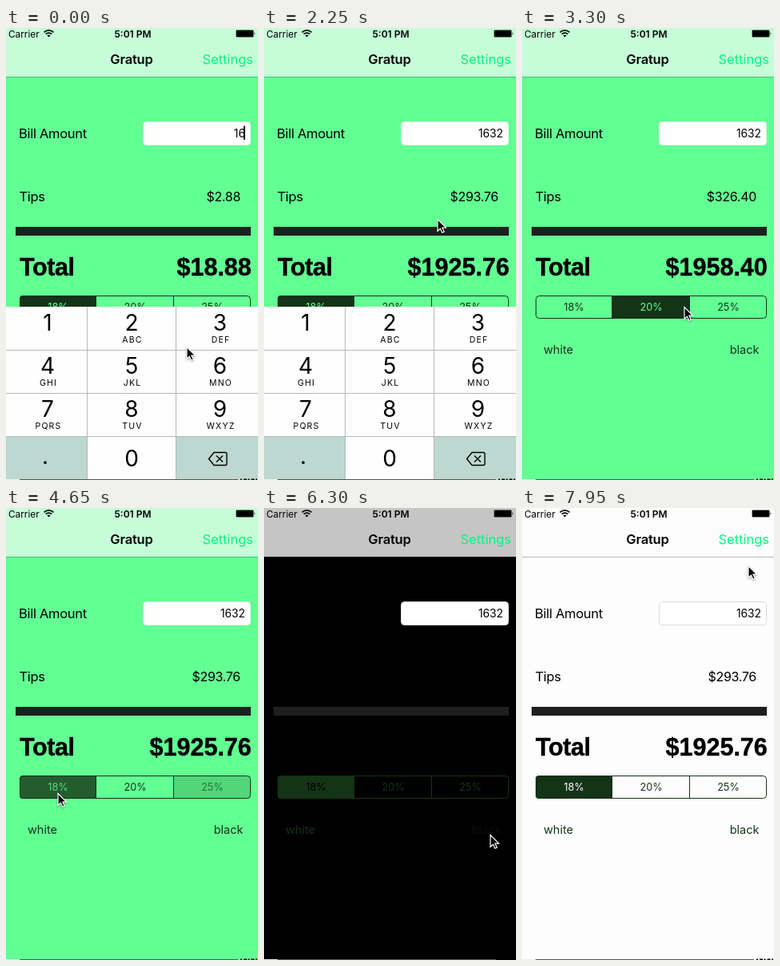
An HTML page that plays this animation: 315x566 px, repeating every 8 s.

```html
<!DOCTYPE html>
<html lang="en">
<head>
<meta charset="utf-8">
<title>Tip calculator</title>
<style>
  html, body { margin: 0; height: 100%; overflow: hidden; }
  svg { display: block; width: 100vw; height: 100vh; font-family: Inter, "Open Sans", sans-serif; }
  text { white-space: pre; }
  .end { text-anchor: end; }
  .mid { text-anchor: middle; }
  .label { font-size: 16.5px; letter-spacing: -.3px; }
  .total { font: bold 30.5px "Liberation Sans", Arial, sans-serif; stroke: #000; stroke-width: .4px; }
  .button { font-size: 14.5px; fill: #143317; }
  .segment { font-size: 12.7px; }
  .digit { font-size: 28px; }
  .letters { font-size: 10.5px; letter-spacing: 1.2px; }
  #cursor { filter: drop-shadow(0 1px 1px rgba(0, 0, 0, .4)); }
</style>
</head>
<body>
<svg id="stage" viewBox="0 0 315 566">
  <defs><clipPath id="pill"><rect x="17" y="335" width="289" height="29" rx="4"/></clipPath></defs>
  <rect id="page" width="315" height="566"/>

  <rect id="nav" width="315" height="61"/>
  <rect y="61" width="315" height="1" opacity=".25"/>
  <text x="3" y="11.5" font-size="11.8">Carrier</text>
  <g fill="none" stroke="#000" stroke-width="1.7">
    <path d="M47.5 5.4Q53.5 .2 59.5 5.4M49.7 7.7Q53.5 4.4 57.3 7.7"/>
    <path d="M51.4 9.2Q53.5 7.6 55.6 9.2L53.5 11.6Z" fill="#000" stroke="none"/>
  </g>
  <text x="158.5" y="11.5" class="mid" font-size="12" font-weight="600">5:01 PM</text>
  <rect x="287.5" y="2.5" width="22" height="9" rx="1.5" fill="none" stroke="#000" stroke-width=".8" opacity=".5"/>
  <path d="M288 3h21v8h-21zM310.5 5q1.8 2 0 4z"/>
  <text x="157" y="45" class="mid" font-size="16.5" font-weight="600" letter-spacing="-.2">Gratup</text>
  <text x="245.5" y="45" font-size="16.5" fill="#00f880">Settings</text>

  <text x="16" y="138" class="label">Bill Amount</text>
  <rect id="field" x="171.5" y="117.5" width="134" height="29" rx="4" fill="#fff"/>
  <text id="bill" x="299" y="136.5" class="end" font-size="13.8"></text>
  <rect id="caret" x="297" y="122.5" width="1.8" height="17.5"/>
  <text x="16.5" y="216.5" class="label">Tips</text>
  <text id="tips" x="293" y="216.5" class="end" font-size="16" letter-spacing="-.3"></text>
  <rect x="12" y="249" width="294" height="11" fill="#1f1f1f"/>
  <text x="17" y="310" class="total" letter-spacing="-.4">Total</text>
  <text id="total" x="306.8" y="310" class="total end"></text>

  <g id="segments" clip-path="url(#pill)"></g>
  <path d="M112.5 335v29M209.5 335v29" stroke="#143317"/>
  <rect x="17.5" y="335.5" width="288" height="28" rx="4" fill="none" stroke="#143317"/>
  <text id="white" x="27" y="408" class="button">white</text>
  <text id="black" x="296.5" y="408" class="button end">black</text>

  <g id="keyboard"></g>
  <path d="M0 565.5H17" stroke="#eee"/>
  <path d="M17 565.5H290" stroke="#555"/>
  <path d="M293 565.3H315" stroke="#000" stroke-width="1.4" stroke-dasharray="2 2 4 1.5"/>
  <path id="cursor" d="M0 .5V15.3L3.4 12.2 5.8 17.3 8.2 16.2 5.9 11.2H10.5Z" stroke="#fff" stroke-width="1.2"/>
</svg>
<script>
const $ = id => document.getElementById(id);
const LOOP = 8000, STEP = 150;
const DARK = '#143317';
const RATES = [18, 20, 25];
const themes = {
  green: { page: '#62ff93', nav: '#c6fdd8', edge: '#e0f0e6' },
  white: { page: '#fdfdfd', nav: '#fcfcfc', edge: '#dcdcdc' },
  black: { page: '#000', nav: '#c5c5c5', edge: '#dcdcdc' },
};

// [time, value]: each value holds until the next entry
const bills = [[0, 16], [300, 163], [1200, 1632]];
const choices = [[0, 0], [3000, 1], [3600, 2], [4450, 0]];
const looks = [[0, 'green'], [5250, 'white'], [6150, 'black'], [7350, 'white']];
const presses = [[0, ''], [300, '3'], [450, ''], [1200, '2'], [1350, ''],
  [5250, 'white'], [5550, ''], [6150, 'black'], [6450, ''], [7350, 'white'], [7500, '']];
const pointer = [
  [0, 226, 399], [300, 262, 377], [600, 262, 377], [1200, 160, 378], [1650, 160, 378],
  [2250, 217, 239], [2550, 217, 239], [3000, 165, 345], [3300, 203, 349], [3600, 255, 349],
  [3900, 255, 349], [4500, 65, 357], [4650, 65, 357], [4950, 59, 401], [5400, 59, 401],
  [6150, 283, 409], [6600, 283, 409], [7200, 50, 400], [7350, 50, 400], [7950, 283, 72],
];

const clamp = v => Math.max(0, Math.min(1, v));
const ease = v => { v = clamp(v); return v * v * (3 - 2 * v); };
const indexAt = (list, t) => list.findLastIndex(entry => entry[0] <= t);
const valueAt = (list, t) => list[indexAt(list, t)][1];

function add(parent, tag, attrs, content = '') {
  const node = document.createElementNS('http://www.w3.org/2000/svg', tag);
  for (const name in attrs) node.setAttribute(name, attrs[name]);
  node.textContent = content;
  return parent.appendChild(node);
}

const segments = RATES.map((rate, i) => {
  const x = [17, 112, 209][i], width = [96, 98, 97][i], middle = [65, 161.5, 258][i];
  const label = () => add($('segments'), 'text', { x: middle, y: 354, class: 'segment mid', fill: DARK }, rate + '%');
  const plain = label();
  const fill = add($('segments'), 'rect', { x, y: 335, width, height: 29, fill: DARK });
  return { plain, fill, chosen: label() };
});

const keyFill = {};
const letters = ['', 'ABC', 'DEF', 'GHI', 'JKL', 'MNO', 'PQRS', 'TUV', 'WXYZ'];
[...'123456789.0<'].forEach((key, i) => {
  const board = $('keyboard'), col = i % 3, row = Math.floor(i / 3);
  const middle = [52, 157, 267.5][col];
  keyFill[key] = add(board, 'rect', {
    x: [0, 101, 212][col], y: 349 + row * 54, width: [101, 111, 103][col], height: row < 3 ? 54 : 55,
    fill: '.<'.includes(key) ? '#bdd8d0' : '#fefefe',
  });
  if (key === '<') {
    add(board, 'path', {
      d: 'M260 531.5H274Q276 531.5 276 533.5V545.5Q276 547.5 274 547.5H260L253.5 539.5ZM263 535.5L271 543.5M271 535.5L263 543.5',
      fill: 'none', stroke: '#000', 'stroke-width': 1.4,
    });
  } else {
    const y = row < 3 ? 379 + row * 54 : 548.5;
    add(board, 'text', { x: key === '.' ? 49 : middle, y: key === '.' ? 546 : y, class: 'digit mid' }, key);
    if (letters[i]) add(board, 'text', { x: middle + 1, y: y + 15, class: 'letters mid' }, letters[i]);
  }
});
add($('keyboard'), 'path', { d: 'M101.5 349V566M212.5 349V566M0 403.5H315M0 457.5H315M0 511.5H315', stroke: '#b5b9b7' });

function drawSegments(t, page) {
  const i = indexAt(choices, t), current = choices[i][1];
  const previous = i ? choices[i - 1][1] : current;
  const fade = i ? clamp((t - choices[i][0]) / 250) : 1;
  segments.forEach(({ plain, fill, chosen }, n) => {
    const amount = n === current ? fade : n === previous ? 1 - fade : 0;
    plain.setAttribute('opacity', 1 - amount);
    fill.setAttribute('opacity', amount);
    chosen.setAttribute('opacity', amount);
    chosen.setAttribute('fill', page);
  });
}

function drawPointer(t) {
  const i = Math.min(indexAt(pointer, t), pointer.length - 2);
  const [t0, x0, y0] = pointer[i], [t1, x1, y1] = pointer[i + 1];
  const k = ease((t - t0) / (t1 - t0));
  $('cursor').setAttribute('transform', `translate(${x0 + (x1 - x0) * k} ${y0 + (y1 - y0) * k})`);
}

function draw(t) {
  const theme = themes[valueAt(looks, t)];
  $('page').setAttribute('fill', theme.page);
  $('nav').setAttribute('fill', theme.nav);
  $('field').setAttribute('stroke', theme.edge);

  const bill = valueAt(bills, t), tip = bill * RATES[valueAt(choices, t)] / 100;
  $('bill').textContent = bill;
  $('tips').textContent = '$' + tip.toFixed(2);
  $('total').textContent = '$' + (bill + tip).toFixed(2);
  $('caret').setAttribute('opacity', t < 750 || (t >= 1050 && t < 1950) ? 1 : 0);

  const pressed = valueAt(presses, t);
  for (const key of '23') keyFill[key].setAttribute('fill', key === pressed ? '#bdd8d0' : '#fefefe');
  for (const id of ['white', 'black']) $(id).setAttribute('opacity', id === pressed ? .3 : 1);

  $('keyboard').setAttribute('transform', `translate(0 ${217 * ease((t - 2400) / 450)})`);
  drawSegments(t, theme.page);
  drawPointer(t);
}

const start = performance.now();
function tick() {
  const t = (performance.now() - start) % LOOP;
  draw(Math.floor(t / STEP) * STEP);
  requestAnimationFrame(tick);
}
tick();
</script>
</body>
</html>
```
